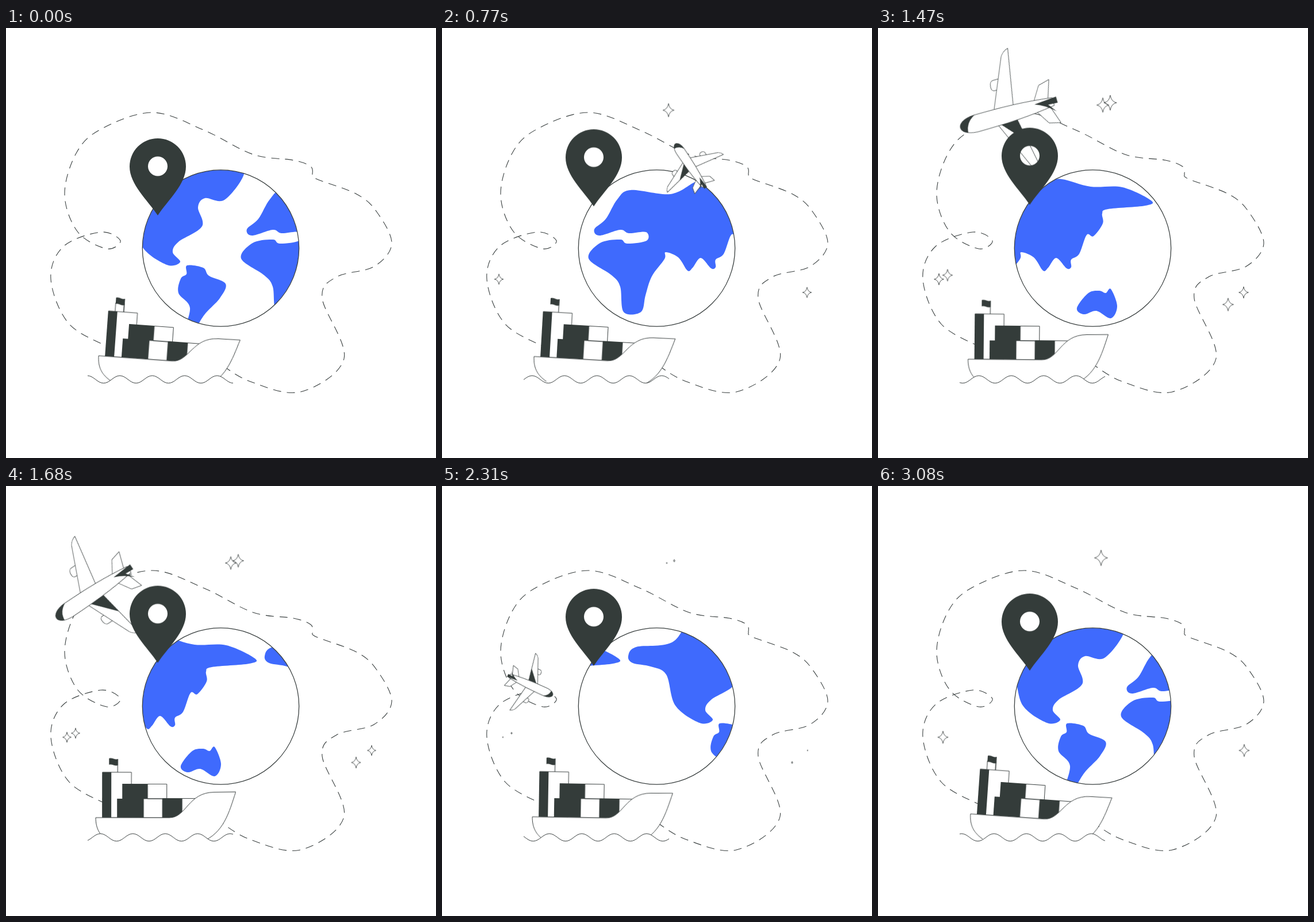
Write an HTML page that moves like this. It is 748 px wide and 748 px high and loops after 3150 ms.

```html
<!DOCTYPE html>
<html lang="en">
<head>
<meta charset="utf-8">
<title>Global shipping</title>
<style>
html, body { margin: 0; width: 100%; height: 100%; overflow: hidden; background: #fff; }
svg { display: block; width: 100vw; height: 100vh; }
svg * { animation-duration: 3150ms; animation-timing-function: linear; animation-iteration-count: infinite; }

.line { fill: none; stroke: #3a4040; stroke-width: 1.1; stroke-linejoin: round; }
.paper { fill: #fff; stroke: #3a4040; stroke-width: 1; stroke-linejoin: round; }
.dark { fill: #343c3a; }
.land { fill: #3f6afd; }
.dash { stroke-dasharray: 14 10; }

#back { animation-name: back; }
#ahead { animation-name: ahead; }
@keyframes back { from { stroke-dashoffset: 14px } to { stroke-dashoffset: 302px } }
@keyframes ahead { from { stroke-dashoffset: 0px } to { stroke-dashoffset: -288px } }

#map { animation-name: spin; }
@keyframes spin { to { transform: translateX(-630px) } }

#wave { animation-name: flow; }
@keyframes flow { to { transform: translateX(-169.2px) } }

#pin { animation-name: hop; animation-duration: 1050ms; }
@keyframes hop {
  0%, 100% { transform: none; animation-timing-function: cubic-bezier(.32, .6, .45, .93) }
  50% { transform: translateY(-19.3px); animation-timing-function: cubic-bezier(.55, .07, .68, .4) }
}

/* The hull rocks while its cargo leans a little further */
#ship, #cargo {
  animation-duration: 1575ms; animation-delay: -2900ms; animation-direction: alternate;
  animation-timing-function: cubic-bezier(.37, 0, .63, 1);
}
#ship { transform-origin: 254px 645px; animation-name: rock; }
#cargo { animation-name: slide; }
@keyframes rock { from { transform: rotate(4.4deg) } to { transform: rotate(0deg) } }
@keyframes slide { from { transform: translateX(3px) } to { transform: translateX(0) } }

#mast { animation-name: mast; }
@keyframes mast { 0%, 4%, 94.5%, 100% { opacity: 1 } 4.1%, 94.4% { opacity: 0 } }

#plane {
  offset-path: path("M488 335C485 320 455 274 432 240C404 199 281 130 224 151C153 177 86 222 101 285C116 348 199 377 241 335L262 314");
  offset-rotate: auto 90deg;
  animation-name: fly;
}
#plane .paper { vector-effect: non-scaling-stroke; stroke-width: .8; }
@keyframes fly {
  0%, 8.9% { offset-distance: 0%; transform: scale(0) }
  24.4% { offset-distance: 14.6%; transform: scale(.53) }
  46.7% { offset-distance: 45.5%; transform: scale(1) }
  62.2% { offset-distance: 71%; transform: scale(.78) }
  84.4% { offset-distance: 96%; transform: scale(.2) }
  89%, 100% { offset-distance: 100%; transform: scale(0) }
}

.star { vector-effect: non-scaling-stroke; stroke-width: .9; transform: scale(0); animation-name: twinkle; animation-iteration-count: 1; }
@keyframes twinkle { 0%, 100% { transform: scale(0) } 32% { transform: scale(1) } }
</style>
</head>
<body>
<svg viewBox="0 0 748 748">
  <defs>
    <clipPath id="disc"><circle cx="373.5" cy="383" r="136"/></clipPath>
    <clipPath id="sea"><rect x="142" y="595" width="253" height="25"/></clipPath>
    <clipPath id="air"><rect x="100" y="440" width="340" height="178"/></clipPath>
    <g id="world" class="land"></g>
  </defs>

  <path id="back" class="line dash"/>
  <path id="ahead" class="line dash"/>

  <g clip-path="url(#disc)">
    <g id="map"><use href="#world"/><use href="#world" x="630"/></g>
  </g>
  <circle class="line" cx="373.5" cy="383" r="136.2" style="stroke-width:1.3"/>

  <g id="plane">
    <g id="side">
      <path class="paper" d="M46-8V-14Q47-19 55-18Q64-17 64-11V2Z"/>
      <path class="paper" d="M12-24L100 14Q108 19 111 29L12 11Z"/>
      <path class="paper" d="M7 46L34 63L39 83L6 72Z"/>
    </g>
    <use href="#side" transform="scale(-1 1)"/>
    <path class="dark" d="M-12-20L-56 19L-12 11Z"/>
    <path class="paper" d="M0-88C10-88 15-72 15-58C15-10 14 30 7 80H-7C-14 30-15-10-15-58C-15-72-10-88 0-88Z"/>
    <path class="dark" d="M0-88C10-88 15-72 15-58Q6-76-12-77Q-8-88 0-88Z"/>
    <path class="dark" d="M4 47L7 87H-4L-3 70L-18 81Q-3 66 4 47Z"/>
  </g>

  <g id="pin">
    <path class="dark" fill-rule="evenodd" d="M264 326C246 299 215 272 215 241A49 49 0 0 1 313 241C313 272 282 299 264 326ZM247 240.500a17 17 0 0 0 34 0a17 17 0 0 0-34 0Z"/>
  </g>

  <g clip-path="url(#air)">
    <g id="ship">
      <path id="mast" class="paper" d="M179 498V483H194V498"/>
      <path class="line" d="M194 498V475"/>
      <path class="dark" d="M194.500 475c-5 2-10-3-15.500-1v11c5-2 10 3 15.500 1z"/>
      <path class="paper" d="M167.500 498H218V577H167.500Z"/>
      <path class="dark" d="M167 498h16v79h-16z"/>
      <g id="cargo">
        <path class="paper" d="M246 518.500h33.500V544H246ZM239 544h33v33h-33ZM306 543.500h34V577h-34Z"/>
        <path class="dark" d="M202 518h44v26h-44zM193 544h46v33h-46zM272 543h34v34h-34z"/>
      </g>
      <path class="paper" d="M180 619C163 609 156 596 156 577H284C314 577 316 533 362 532.500L399.500 532C388 567 379 604 340 619"/>
    </g>
  </g>
  <g clip-path="url(#sea)"><path id="wave" class="paper"/></g>

  <g id="stars" class="line"></g>
</svg>
<script>
const $ = id => document.getElementById(id);

// Smooth curve through "x,y x,y ..." key points
function smooth(text, closed) {
  const p = text.trim().split(/\s+/).map(s => s.split(',').map(Number));
  const n = p.length;
  const at = i => closed ? p[(i + n) % n] : p[Math.max(0, Math.min(n - 1, i))];
  let d = 'M' + p[0];
  for (let i = 0; i < (closed ? n : n - 1); i++) {
    const [a, b, c, e] = [at(i - 1), at(i), at(i + 1), at(i + 2)];
    const c1 = b.map((v, k) => v + (c[k] - a[k]) / 6);
    const c2 = c.map((v, k) => v - (e[k] - b[k]) / 6);
    d += `C${c1} ${c2} ${c}`;
  }
  return closed ? d + 'Z' : d;
}

const lands = {
  northAmerica: `156,296 170,280 232,272 280,225 400,225 414,254 380,299 346,296 334,312
    341,345 300,372 290,390 303,407 280,412 238,382 222,328 195,314 164,308`,
  southAmerica: `315,413 343,417 353,431 382,445 372,470 345,499 322,535 308,535 320,487
    300,461 304,436 314,428`,
  oldWorld: `419,350 439,332 459,298 482,282 551,289 594,268 614,263 664,276 719,277 769,300
    759,309 694,315 684,323 685,340 669,362 657,360 644,393 630,403 630,416 622,418 604,400
    590,417 581,422 565,399 543,390 541,402 519,432 508,465 500,494 470,494 464,450 449,430
    409,401 429,374 464,368 476,375 510,370 509,355 479,357 464,351 428,361`,
  australia: '640,487 660,461 679,457 690,461 699,454 710,484 699,505 674,492 652,498'
};
$('world').innerHTML = Object.values(lands).map(s => `<path d="${smooth(s, true)}"/>`).join('');

// The route runs both ways from the kink beside the globe
$('back').setAttribute('d', smooth(
  `533,255 541,263 610,289 645,320 671,375 640,415 575,433 550,470 588,575 512,633
   425,615 372,584`));
$('ahead').setAttribute('d', smooth(
  `533,255 530,241 500,230 430,220 345,178 255,147 165,176 122,218 102,290 125,355 175,384
   199,370 165,355 100,380 78,437 110,515 185,558`));

// Swell: crest to trough and back every 56.4 px
let swell = 'M85.2 604.8';
for (let i = 0; i < 18; i++) {
  const dy = i % 2 ? -13 : 13;
  swell += `c11 0 17.200 ${dy} 28.200 ${dy}`;
}
$('wave').setAttribute('d', swell + 'V700H85Z');

// Each spot twinkles three times, drifting a little between rounds
const pulses = {
  big: [[70, 530], [1050, 1400], [2310, 530]],
  small: [[250, 1200], [1100, 1280], [2560, 1550]]
};
const spots = [
  { kind: 'big', x: 397, y: 129, dx: 7, dy: 1, r: 14 },
  { kind: 'small', x: 394, y: 143, dx: -3, dy: -9, r: 14 },
  { kind: 'big', x: 120, y: 431, dx: 1, dy: -1, r: 11 },
  { kind: 'small', x: 99, y: 437, dx: 7, dy: 0, r: 11 },
  { kind: 'big', x: 603, y: 476, dx: 6, dy: 5, r: 12 },
  { kind: 'small', x: 635, y: 460, dx: 1, dy: 0, r: 11 }
];
const star = r => {
  const w = r * .84, k = r * .13;
  return `M0 ${-r}Q${k} ${-k} ${w} 0Q${k} ${k} 0 ${r}Q${-k} ${k} ${-w} 0Q${-k} ${-k} 0 ${-r}Z`;
};
$('stars').innerHTML = spots.flatMap(s => pulses[s.kind].map(([begin, length], i) =>
  `<g transform="translate(${s.x + s.dx * i} ${s.y + s.dy * i})"><path class="star" d="${star(s.r)}"
    style="animation-delay:${begin}ms;animation-duration:${length}ms"/></g>`)).join('');

// All motion advances on a 70 ms beat
const beat = 70, loop = 3150;
const anims = document.getAnimations();
anims.forEach(a => a.pause());
const start = performance.now();
function tick() {
  const t = Math.floor((performance.now() - start) % loop / beat) * beat;
  anims.forEach(a => { a.currentTime = t; });
  requestAnimationFrame(tick);
}
tick();
</script>
</body>
</html>
```
